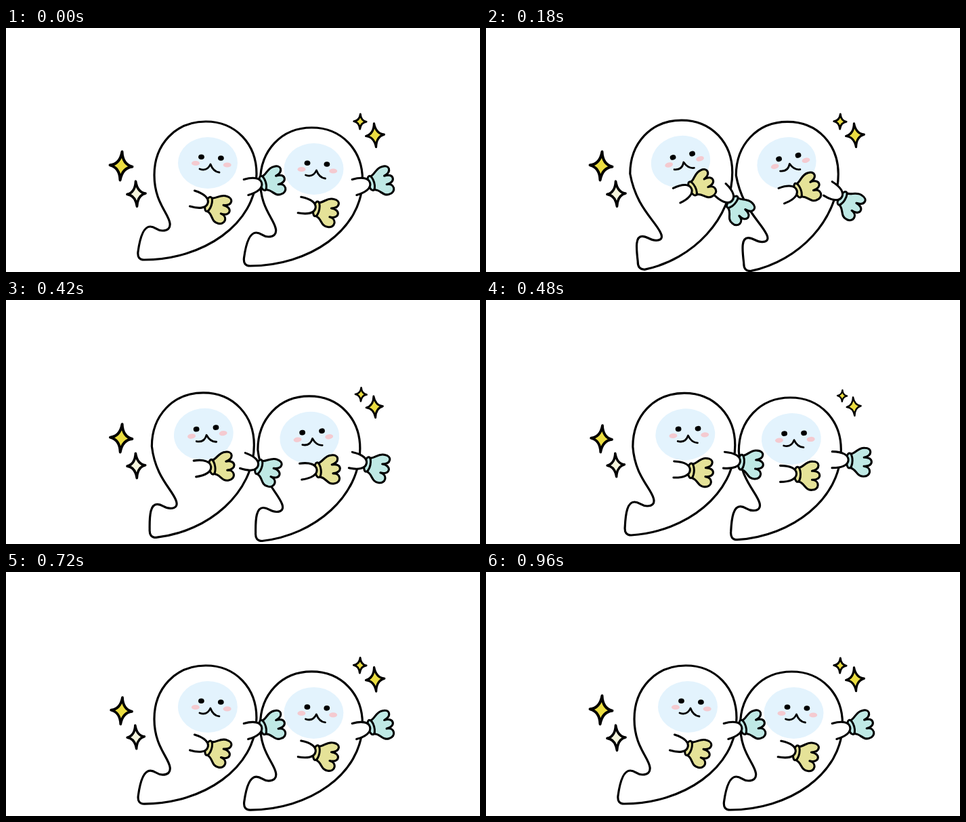
Recreate the animation shown at these times as an HTML page. Size 700x360 px, loop 1470 ms.

```html
<!DOCTYPE html>
<html lang="en">
<head>
<meta charset="utf-8">
<title>Cheering ghosts</title>
<style>
  html, body { margin: 0; height: 100%; overflow: hidden; background: #fff; }
  svg { display: block; }
</style>
</head>
<body>
<svg id="stage" width="700" height="360" viewBox="0 0 700 360"
     stroke-linecap="round" stroke-linejoin="round"></svg>
<script>
const LOOP = 1470, STEP = 30;
const stage = document.getElementById('stage');

const clamp = v => Math.min(1, Math.max(0, v));
const smooth = v => { v = clamp(v); return v * v * (3 - 2 * v); };
const bump = (t, mid, width) => Math.exp(-(((t - mid) / width) ** 2));

const oval = (x, y, rx, ry, fill) =>
  `<ellipse cx="${x}" cy="${y}" rx="${rx}" ry="${ry}" fill="${fill}"/>`;
const line = (d, fill = 'none', width = 3.1) =>
  `<path d="${d}" fill="${fill}" stroke="#000" stroke-width="${width}"/>`;
const place = (x, y, angle, content) =>
  `<g transform="translate(${x} ${y}) rotate(${angle})">${content}</g>`;
const zoom = (x, y, size, content) =>
  `<g transform="translate(${x} ${y}) scale(${size}) translate(${-x} ${-y})">${content}</g>`;

// Upright outline; the tail swings right and down as the ghost leans
const BODY = `M295 138C340 138 370 172 370 215C370 290 290 342 204 342
  C197 342 194 338 195 330C198 308 203 293 213 293C221 293 222 299 231 299
  C239 299 243 295 242 288C240 273 219 257 219 217C219 172 250 138 295 138Z`;

function body(p) {
  return BODY.replace(/(\d+) (\d+)/g, (_, x, y) => {
    const depth = clamp((y - 217) / 125), side = clamp((370 - x) / 128);
    const dx = 38 * smooth(depth) * side - 6.5;
    const dy = 17 * clamp(depth * 1.7) * (1.5 * side * side - .5) - 2;
    return `${+x + dx * p} ${+y + dy * p}`;
  });
}

const PINK = '#f4cad0';
const FACE = oval(0, 0, 44, 38, '#e3f3fd')
  + oval(-18, .5, 6, 3.6, PINK) + oval(28.7, 3, 6, 3.6, PINK)
  + oval(-9.5, -8.8, 4.4, 3.8, '#000') + oval(19.4, -7, 4.4, 3.8, '#000')
  + line('M-12 9Q-1 13 4 2Q8 13 17 14', 'none', 2.8);

// Glove, cuff and sleeve, pointing right from the shoulder
const arm = color =>
  line('M28-9C34-10 39-19 48-18C59-18 60-7 47-4C62-5 62 10 47 9'
    + 'C59 10 58 24 47 24C37 25 36 14 28 12Z', color)
  + `<g stroke="#000" stroke-width="3">${oval(25.5, 1, 4.5, 11, color)}</g>`
  + line('M0-12C16-12 24-7 24 0C24 8 14 12 0 12', '#fff');
const YELLOW_ARM = arm('#e5e298'), BLUE_ARM = arm('#bfe9e5');

const ghost = (x, y, p) => place(x, y, 0,
  line(body(p), '#fff', 3.2) + place(298 - 11 * p, 199 - 2 * p, -15 * p, FACE));

// Four-pointed sparkle with half sizes w and h
const star = (x, y, w, h, angle, fill, width) => {
  const a = w * .12, b = h * .12;
  return place(x, y, angle,
    line(`M0 ${-h}Q${a} ${-b} ${w} 0Q${a} ${b} 0 ${h}Q${-a} ${b} ${-w} 0Q${-a} ${-b} 0 ${-h}Z`, fill, width));
};
const GOLD = '#ebdd42';
const LEFT_STARS = star(170, 203.5, 16.5, 21, 4, GOLD, 4)
  + star(192.5, 244.7, 13.5, 18.5, -3, '#f4f4dc', 3.7);
const RIGHT_STARS = star(523, 138, 9.2, 11, 2, GOLD, 2.9)
  + star(545, 158.3, 13.5, 17.5, -5, GOLD, 3.2);

function draw(now) {
  const t = Math.floor(now % LOOP / STEP) * STEP;
  const p = 1.03 * smooth(t / 215) * bump(Math.max(t, 255), 255, 212);
  const leftSize = 1 - .2 * bump(t, 600, 110);
  const rightSize = 1 - .3 * bump(t, 540, 110) + .06 * bump(t, 780, 90);
  stage.innerHTML = zoom(180, 225, leftSize, LEFT_STARS)
    + zoom(537, 153, rightSize, RIGHT_STARS)
    + ghost(156.5, 9 - 7 * p, p)
    + place(433.5 + 3 * p, 261 - 14 * p, 11 - 33 * p, YELLOW_ARM)
    + place(514.5 - 10 * p, 235 + 2 * p, 50 * p - 16, BLUE_ARM)
    + ghost(0, 0, p)
    + place(275 + 7 * p, 251.5 - 4.5 * p, 17 - 45 * p, YELLOW_ARM)
    + place(354.5 - 9 * p, 235 + 3.5 * p, 62 * p - 16, BLUE_ARM);
}

let begin;
function tick(now) {
  begin ??= now;
  draw(now - begin);
  requestAnimationFrame(tick);
}
draw(0);
requestAnimationFrame(tick);
</script>
</body>
</html>
```
